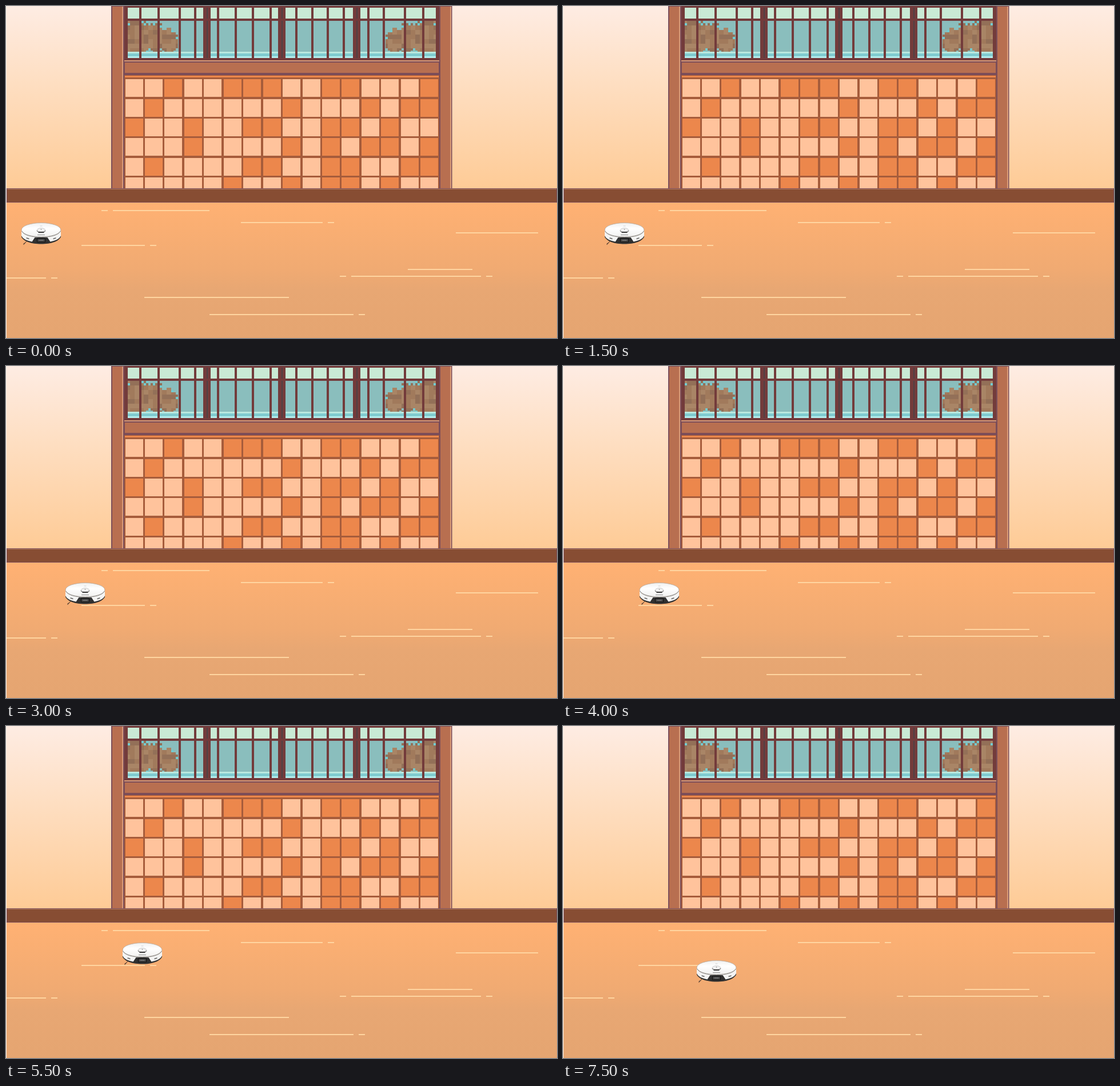
An HTML page with a canvas for the animation above (8000 ms loop, 964 by 581 pixels).

```html
<!DOCTYPE html>
<html lang="en">
<head>
<meta charset="utf-8">
<title>Robot vacuum</title>
<style>
  html, body { margin: 0; width: 100%; height: 100%; overflow: hidden; }
  canvas, svg { position: absolute; left: 0; top: 0; width: 964px; height: 581px; }
</style>
</head>
<body>
<canvas id="room" width="964" height="581"></canvas>
<svg viewBox="0 0 964 581">
  <defs>
    <linearGradient id="lid" x2="0" y2="1">
      <stop offset="0" stop-color="#f0f0ef"/>
      <stop offset=".4" stop-color="#fff"/>
      <stop offset="1" stop-color="#f2f2f1"/>
    </linearGradient>
  </defs>
  <!-- Origin: top left corner of the robot -->
  <g id="robot">
    <path d="M10 32L4 39M8 35l-4 2" fill="none" stroke="#4b3a30"/>
    <path d="M.5 20V25C4 33 18 37.500 35 37.500S66 33 69.500 25V20z" fill="#303030"/>
    <path d="M.5 13V23C3 29 11 32 19 33.500L24 26H46L51 33.500C59 32 67 29 69.500 23V13z" fill="#f4f4f3"/>
    <path d="M28 28H42V34H28z" fill="#444" stroke="#111"/>
    <path d="M31 31H39" stroke="#8b8b8b"/>
    <path d="M9 26l5 1.500v2l-5-1.500zM61 26l-5 1.500v2l5-1.500z" fill="#777"/>
    <ellipse cx="35" cy="12.700" rx="34.300" ry="12.200" fill="url(#lid)" stroke="#aaa29b" stroke-width=".7"/>
    <path d="M1 15C5 22 18 25.500 35 25.500S65 22 69 15" fill="none" stroke="#77736f" stroke-width=".9"/>
    <path d="M27 13.500C28 19 42 19 43 13.500L40 16H30z" fill="#333"/>
    <ellipse cx="35" cy="13" rx="7" ry="3.300" fill="#f3f3f3" stroke="#aaa" stroke-width=".6"/>
    <path d="M30 17H40" stroke="#333" stroke-width="1.800"/>
    <path d="M28.500 21.500H41.500" stroke="#999" stroke-width="1.200"/>
    <circle cx="35" cy="12" r=".8" fill="#777"/>
    <path d="M33 6H37" stroke="#d0d0d0"/>
  </g>
</svg>
<script>
const ctx = document.getElementById('room').getContext('2d');
const robot = document.getElementById('robot');
const WOOD = '#b86f50', PLUM = '#7b4d59', FRAME = '#733b3b', GLOSS = '#d99b78';
const DARK_TILE = '#ec874c', LIGHT_TILE = '#ffc39c';

function box(color, x1, y1, x2, y2) {
  ctx.fillStyle = color;
  ctx.fillRect(x1, y1, x2 - x1, y2 - y1);
}

function fade(y1, y2, ...stops) {
  const gradient = ctx.createLinearGradient(0, y1, 0, y2);
  stops.forEach(([at, color]) => gradient.addColorStop(at, color));
  box(gradient, 0, y1, 964, y2);
}

// Dark tiles form diagonals that rise or fall, with upright pairs on odd rows.
function isDark(row, col) {
  const rise = col + row, fall = col - row;
  if ([3, 16, 19].includes(rise)) return true;
  return row % 2
    ? (col > 5 && col < 12 && col % 4 > 1) || rise === 6 || fall === 10
    : col === 8 || rise === 14 || rise === 17 || fall === -1;
}

function drawTiles() {
  const pitch = 34.45;
  box('#a65c3b', 206, 120, 759, 319);
  box(DARK_TILE, 208, 122, 757, 125);
  for (let row = 1; row <= 6; row++) {
    for (let col = 0; col < 16; col++) {
      const x = Math.round(206.5 + col * pitch), y = Math.round(91.6 + row * pitch);
      box(isDark(row, col) ? DARK_TILE : LIGHT_TILE, x + 2, y + 2, x + 33, Math.min(y + 33, 319));
    }
  }
}

function drawTree(mirrored) {
  const size = 4, browns = ['#a17a5c', '#937058', '#a98566'];
  const noise = (x, y) => Math.abs(Math.sin(x * 12.9 + y * 78.2) * 437.5) % 1;
  const blobs = [[228, 54, 32, 32], [256, 53, 22, 26], [282, 60, 17, 24]];
  for (let y = 26; y < 80; y += size) {
    for (let x = 213; x < 301; x += size) {
      const depth = Math.min(...blobs.map(([cx, cy, rx, ry]) => Math.hypot((x - cx) / rx, (y - cy) / ry)));
      if (depth > .9 + noise(x, y) * .2) continue;
      const brown = browns[Math.floor(noise(x >> 3, y >> 3) * 3)];
      const rim = depth > .85 && noise(y, x) < .3;
      const left = mirrored ? 965 - x - size : x;
      box(rim ? '#72cbd0' : brown, left, y, left + size, y + size);
    }
  }
}

function drawWindow() {
  box('#8abebd', 207, 0, 758, 97);
  box('#c9ead5', 207, 3, 758, 23);
  drawTree(false);
  drawTree(true);
  box('#b9e8df', 213, 80, 752, 83);
  box('#80cbd0', 213, 83, 752, 88);
  box('#b5eeee', 213, 88, 752, 91);

  const bar = x => box(FRAME, Math.round(x) - 2, 0, Math.round(x) + 2, 92);
  for (const x of [235, 267, 304, 331]) {
    bar(x);
    bar(965 - x);
  }
  for (let i = 0; i < 4; i++) {
    bar(371 + i * 30.5);
    bar(508 + i * 27.5);
  }
  for (const x of [351, 482, 613]) {
    box(FRAME, x - 6, 0, x + 7, 95);
    box('#4f4245', x, 0, x + 2, 95);
  }
  for (const x of [207, 752]) box(FRAME, x, 0, x + 6, 95);
  box(FRAME, 207, 0, 758, 3);
  box(FRAME, 207, 22, 758, 26);
  box(FRAME, 207, 91, 758, 95);

  box(GLOSS, 207, 95, 758, 97);
  box(PLUM, 207, 97, 758, 121);
  box(WOOD, 208, 99, 757, 117);
}

function drawPillar(x, width) {
  box(PLUM, x, 0, x + width, 319);
  box(WOOD, x + 2, 1, x + 19, 319);
  box(GLOSS, x + 19, 1, x + 21, 319);
}

// A long streak, with short dashes before or after it.
function drawStreak(x, y, length, dashes = '') {
  const dash = 11, gap = 9;
  const line = (from, size) => box('#ffd5a0', from, y, from + size, y + 2);
  line(x, length);
  if (dashes.includes('before')) line(x - gap - dash, dash);
  if (dashes.includes('after')) line(x + length + gap, dash);
}

function drawFloor() {
  fade(344, 581, [0, '#ffb173'], [.5, '#f0aa72'], [.64, '#e8a773'], [1, '#e5a571']);
  drawStreak(187, 357, 169, 'before');
  drawStreak(411, 378, 143, 'after');
  drawStreak(787, 396, 144);
  drawStreak(132, 418, 111, 'after');
  drawStreak(703, 460, 113);
  drawStreak(604, 472, 227, 'before after');
  drawStreak(0, 475, 70, 'after');
  drawStreak(242, 509, 253);
  drawStreak(356, 539, 252, 'after');

  box(PLUM, 0, 319, 964, 344);
  box('#b47c60', 2, 320, 963, 321);
  box('#874d33', 2, 321, 963, 343);
}

fade(0, 320, [0, '#feece3'], [.4, '#fedfc3'], [1, '#fecb96']);
drawTiles();
drawWindow();
drawPillar(184, 23);
drawPillar(758, 22.5);
drawFloor();
box('#fff8ef', 0, 0, 1, 581);

// One hop every half second: a rest at beat 5, a leap at beat 11, downwards after beat 13.
function hopsAt(beat) {
  const across = beat - (beat >= 5 ? 1 : 0) + (beat >= 11 ? 1.5 : 0);
  return { right: Math.min(across, 13.5), down: Math.max(0, beat - 13) };
}

function render() {
  const hop = 15.35;
  const { right, down } = hopsAt(Math.floor(performance.now() % 8000 / 500));
  const x = 26.5 + Math.round(right * hop), y = 379 + Math.round(down * hop);
  robot.setAttribute('transform', `translate(${x} ${y})`);
  requestAnimationFrame(render);
}
render();
</script>
</body>
</html>
```
